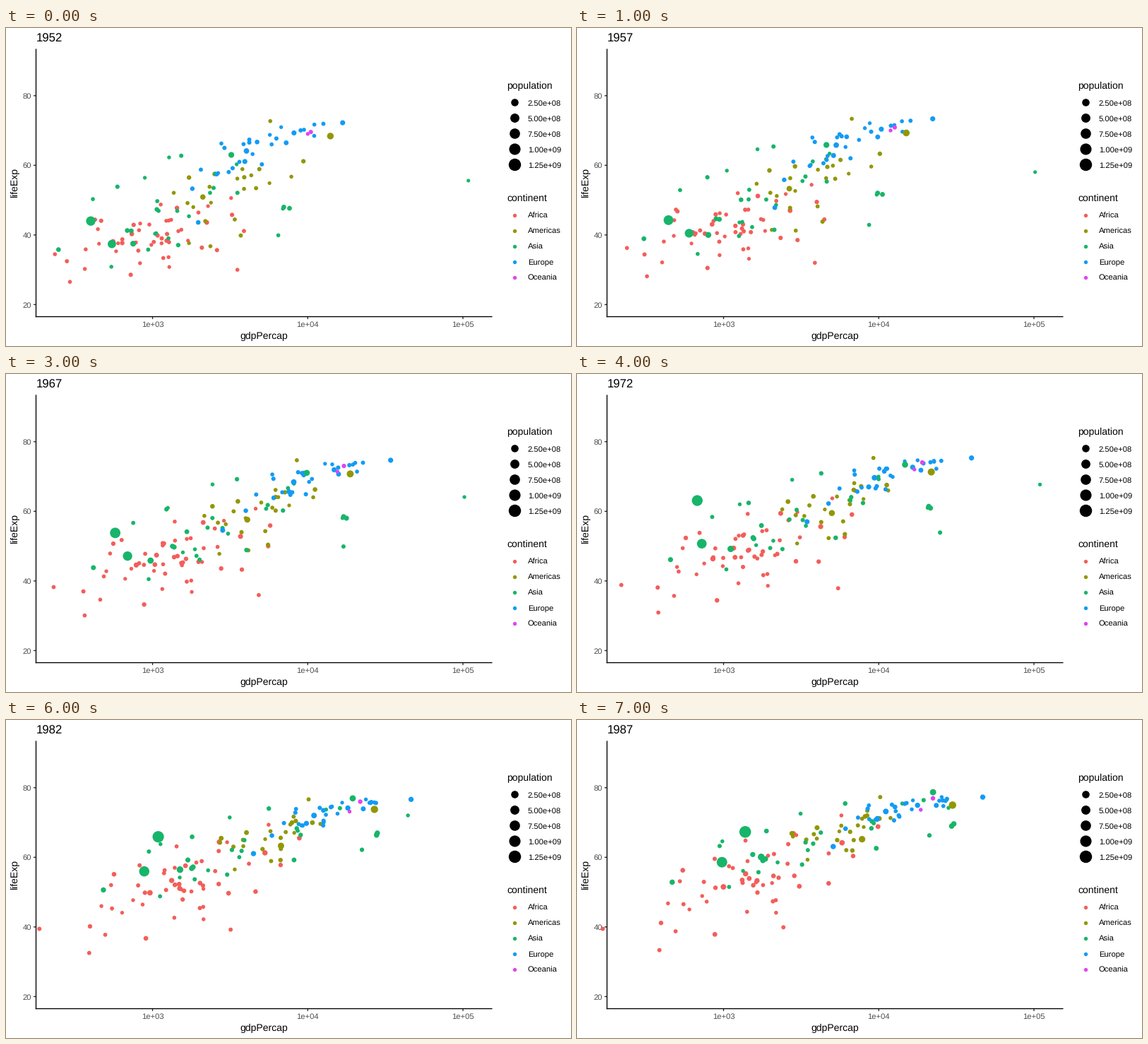
Recreate the animation shown at these times as a matplotlib script. Size 800 by 450 pixels, loop 8 s.

```python
import numpy as np
import matplotlib.pyplot as plt
from matplotlib.animation import FuncAnimation

W, H, DPI = 800, 450, 100
PT = 72 / DPI  # points per pixel
YEARS = range(1952, 1988, 5)
COLORS = {"Africa": "#f35e5a", "Americas": "#929705", "Asia": "#17b56a",
          "Europe": "#129bf5", "Oceania": "#e045f0"}

plt.rcParams["font.family"] = "Liberation Sans"
plt.rcParams["text.hinting"] = "none"
rng = np.random.default_rng(7)


def px(log_gdp):
    return 207.5 + 219.75 * (log_gdp - 3)


def py(life):
    return 391.4 - 4.927 * (life - 20)


def radius(pop):
    size = 2 + 6 * np.sqrt(pop / 1319)
    return 0.375 * (2.845 * size + 0.94)


def area(r):
    return (2 * r * PT) ** 2


def mix(a, b, t):
    return a + (b - a) * t


def normals(n):
    """Standardised normal draws without extreme tails."""
    z = rng.normal(size=n)
    return np.clip((z - z.mean()) / z.std(), -2.1, 2.1)


class Crowd:
    """Small countries spread around their continent's moving average.

    start and end: mean and spread of log income, mean and spread of
    life expectancy, correlation of the two.
    """

    def __init__(self, name, n, pop, growth, start, end):
        self.color, self.n, self.growth = COLORS[name], n, growth
        self.start, self.end = start, end
        self.rich, self.fit = normals(n), normals(n)
        self.rich_end = 0.92 * self.rich + 0.39 * normals(n)
        self.pop = pop * np.exp(normals(n))

    def at(self, t):
        gain, care = 1 - (1 - t) ** 2, t ** 0.85
        m_in, _, m_life, _, _ = self.start
        income = mix(m_in, self.end[0], gain)
        life = mix(m_life, self.end[2], care)
        s_in, s_life, corr = (mix(self.start[k], self.end[k], t) for k in (1, 3, 4))
        z = mix(self.rich, self.rich_end, t)
        lift = corr * z + np.sqrt(1 - corr ** 2) * self.fit
        # nobody lives much beyond the best of the time
        years = np.minimum(life + s_life * lift, mix(72.7, 77.3, t))
        return px(income + s_in * z), py(years), self.pop * np.exp(self.growth * t)


class Landmark:
    """A country that stands out, led through a few (gdp, life) points."""

    years = np.array([0, 10, 20, 35]) / 35

    def __init__(self, name, pop, pop_end, *path):
        self.color, self.n, self.pops = COLORS[name], 1, (pop, pop_end)
        gdp, life = np.array(path).T
        self.x, self.y = px(np.log10(gdp)), py(life)

    def at(self, t):
        return ([np.interp(t, self.years, self.x)],
                [np.interp(t, self.years, self.y)], [mix(*self.pops, t)])


world = [
    Crowd("Africa", 51, 4, 0.9, (2.98, 0.29, 39.2, 5.0, 0.3), (3.17, 0.36, 53.5, 7.6, 0.6)),
    Crowd("Americas", 23, 4, 0.7, (3.51, 0.22, 52.7, 9.0, 0.6), (3.77, 0.21, 68, 5.5, 0.75)),
    Crowd("Asia", 27, 6, 0.8, (3.15, 0.36, 47.5, 9.0, 0.5), (3.6, 0.47, 64.6, 7.0, 0.75)),
    Crowd("Europe", 29, 8, 0.2, (3.7, 0.25, 65.1, 5.0, 0.85), (4.18, 0.22, 74, 2.4, 0.8)),
    Crowd("Oceania", 2, 4, 0.5, (4.01, 0.01, 69.3, 0.2, 0.5), (4.31, 0.03, 75.3, 1.0, 0.8)),
    Landmark("Asia", 556, 1084, (400, 44), (488, 44.5), (677, 63.1), (1379, 67.3)),
    Landmark("Asia", 372, 788, (547, 37.4), (658, 43.6), (724, 50.7), (977, 58.6)),
    Landmark("Asia", 82, 169, (750, 37.5), (849, 42.5), (1111, 49.2), (1748, 60.1)),
    Landmark("Asia", 86, 122, (3217, 63), (6577, 68.7), (14779, 73.4), (22376, 78.7)),
    Landmark("Asia", 0.2, 2, (108382, 55.6), (95458, 60.5), (109348, 67.7), (28118, 74.2)),
    Landmark("Asia", 4, 15, (6460, 39.9), (11626, 45.9), (24837, 53.9), (21198, 66.3)),
    Landmark("Africa", 4, 8, (3521, 30), (4269, 34), (5473, 37.9), (2430, 39.9)),
    Landmark("Europe", 22, 53, (1969, 43.6), (2323, 52.1), (3451, 57), (5089, 63.1)),
    Landmark("Americas", 57, 143, (2109, 50.9), (3337, 55.7), (4986, 59.5), (7807, 65.2)),
    Landmark("Americas", 158, 243, (13990, 68.4), (16173, 70.2), (21806, 71.3), (29884, 75)),
]


def state(year):
    """Pixel positions and marker areas of all countries in a year."""
    t = (year - YEARS[0]) / 35
    x, y, pop = np.hstack([part.at(t) for part in world])
    return np.column_stack([x, y]), area(radius(pop))


fig = plt.figure(figsize=(W / DPI, H / DPI), dpi=DPI, facecolor="white")
ax = fig.add_axes([0, 0, 1, 1])
ax.set(xlim=(0, W), ylim=(H, 0))
ax.axis("off")


def label(x, y, s, size, color="black", **kw):
    return ax.text(x, y, s, fontsize=size * PT, color=color, va="baseline", **kw)


def line(xs, ys, color):
    ax.plot(xs, ys, color=color, lw=1.36 * PT, solid_capstyle="butt", snap=False)


def dot(x, y, r, color):
    ax.scatter([x], [y], s=area(r), c=color, linewidths=0)


for life in (20, 40, 60, 80):
    line([39, 42.5], [py(life)] * 2, "#333333")
    label(36.2, py(life) + 4, str(life), 11.2, "#4d4d4d", ha="right")
for power in (3, 4, 5):
    line([px(power)] * 2, [408.5, 412], "#333333")
    label(px(power), 423, f"1e+0{power}", 11.2, "#4d4d4d", ha="center")
line([42.5, 42.5], [29.5, 409.2], "black")
line([41.8, 688.5], [408.5, 408.5], "black")
label(365.3, 440, "gdpPercap", 14, ha="center")
label(16.5, 219.3, "lifeExp", 14, ha="center", rotation=90, rotation_mode="anchor")

label(709.5, 86, "population", 14)
label(709.5, 245, "continent", 14)
for i, (name, color) in enumerate(COLORS.items()):
    pop = 250 * (i + 1)
    y = 105.4 + 22 * i
    dot(720.4, y, radius(pop), "black")
    label(738.8, y + 4.2, f"{pop * 1e6:.2e}", 11.2)
    y = 264.6 + 22 * i
    dot(720.4, y, 2.7, color)
    label(738.8, y + 4.2, name, 11.2)

title = label(42.5, 20, "", 16.8)
spots, sizes = state(YEARS[0])
cloud = ax.scatter(*spots.T, s=sizes, linewidths=0, zorder=3,
                   c=[part.color for part in world for _ in range(part.n)])


def draw(i):
    spots, sizes = state(YEARS[i])
    cloud.set_offsets(spots)
    cloud.set_sizes(sizes)
    title.set_text(str(YEARS[i]))
    return cloud, title


anim = FuncAnimation(fig, draw, frames=len(YEARS), interval=1000, repeat=True,
                     repeat_delay=0)
plt.show()
```
